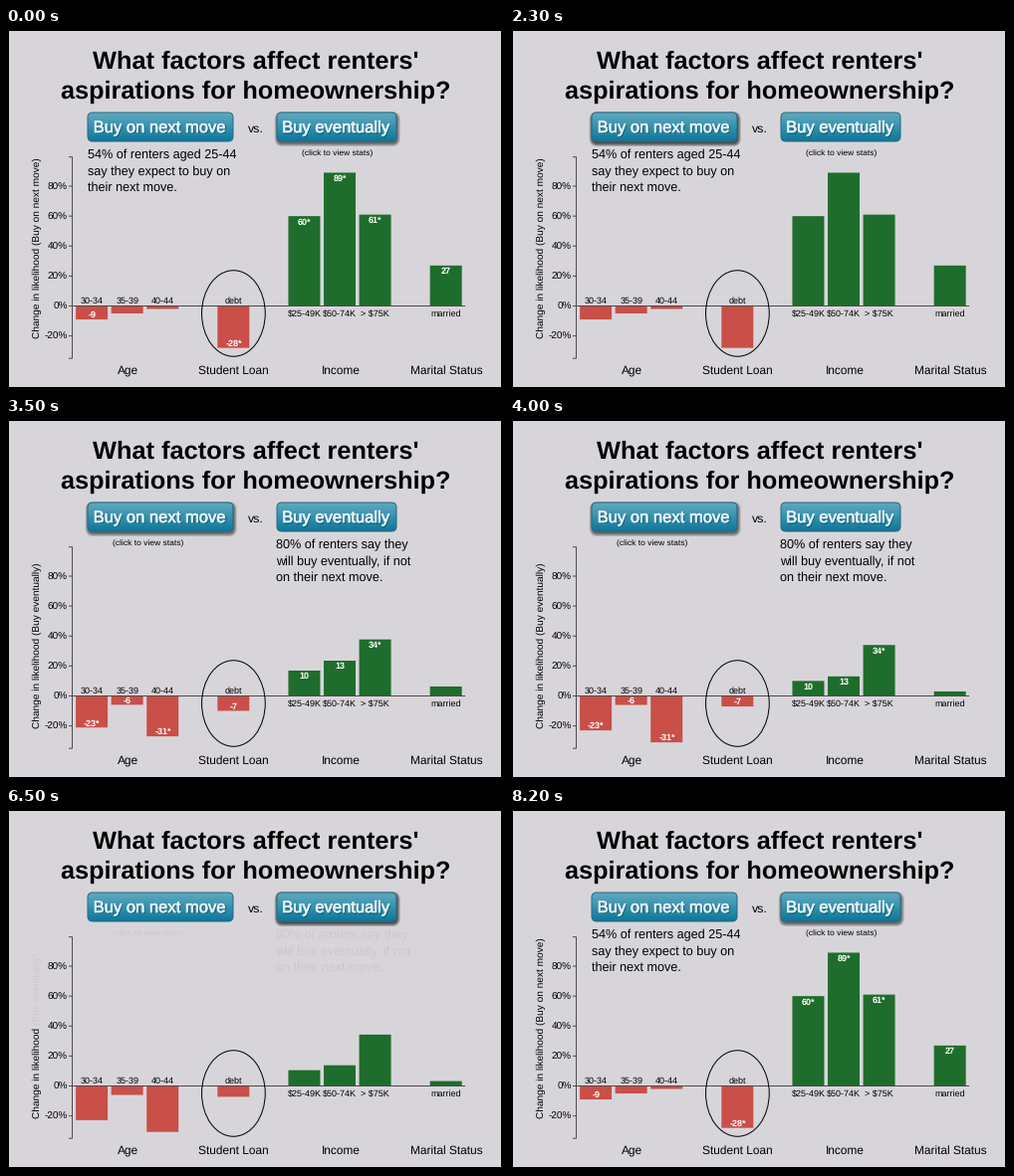
A matplotlib script that plays this animation: 500 by 364 pixels, repeating every 8500 ms.

```python
import matplotlib.pyplot as plt
import numpy as np
from matplotlib.animation import FuncAnimation
from matplotlib.colors import LinearSegmentedColormap
from matplotlib.patches import Ellipse, FancyBboxPatch, Rectangle
from matplotlib.patheffects import withStroke

plt.rcParams["font.family"] = "Liberation Sans"
plt.rcParams["text.hinting"] = "none"
plt.rcParams["path.snap"] = False

W, H, DPI = 500, 364, 100
STEP, LOOP = 100, 8500
CLICKS = (2170, 6187)      # to "eventually", back to "next move"
MOVE = 1900
ZERO, UNIT = 279.5, 1.506  # y of 0 % and pixels per percent
BG, RED, GREEN = "#d8d5da", "#c94f48", "#1f6d2c"

SLOTS = [0, 1, 2, 4, 6, 7, 8, 10]
NAMES = ["30-34", "35-39", "40-44", "debt",
         "$25-49K", "$50-74K", "> $75K", "married"]
VALUES = [np.array([-9, -5, -2, -28, 60, 89, 61, 27]),
          np.array([-23, -6, -31, -7, 10, 13, 34, 3])]
MARKS = [["-9", "", "", "-28*", "60*", "89*", "61*", "27"],
         ["-23*", "-6", "-31*", "-7", "10", "13", "34*", ""]]

fig = plt.figure(figsize=(W / DPI, H / DPI), dpi=DPI, facecolor="black")
ax = fig.add_axes([0, 0, 1, 1])
ax.axis("off")
ax.add_patch(Rectangle((3, 3), W - 6, H - 6, fc=BG, lw=0, zorder=0))


def pt(px):
    return px * 72 / DPI


def text(x, y, s, size, ha="left", **kw):
    kw.setdefault("color", "black")
    return ax.text(x, y, s, fontsize=pt(size), ha=ha, va="baseline", **kw)


def line(xs, ys, color="#4c4a4d", width=1):
    ax.plot(xs, ys, color=color, lw=pt(width), solid_capstyle="butt",
            solid_joinstyle="miter")


def rounded(x0, y0, x1, y1, r, **kw):
    box = FancyBboxPatch((x0, y0), x1 - x0, y1 - y0,
                         boxstyle=f"round,pad=0,rounding_size={r}", **kw)
    return ax.add_patch(box)


def button(x0, x1, label):
    y0, y1 = 85, 114
    shade = [rounded(x0 - g + 0.7, y0 - g + 2, x1 + g + 0.7, y1 + g + 2,
                     5 + g, fc="black", lw=0, zorder=2)
             for g in (0, 1, 2, 3)]
    face = rounded(x0, y0, x1, y1, 5, fc="none", ec="#236a84",
                   lw=pt(1), zorder=4)
    cmap = LinearSegmentedColormap.from_list(
        "teal", ["#62a9be", "#3392af", "#0f7697"])
    img = ax.imshow(np.linspace(0, 1, 64)[:, None], cmap=cmap, aspect="auto",
                    extent=(x0, x1, y1, y0), zorder=3,
                    interpolation="bilinear")
    img.set_clip_path(face)
    mid = (x0 + x1) / 2 - 0.8
    text(mid + 1, 106, label, 16.6, "center", color="#0d4258", alpha=0.5,
         zorder=5)
    text(mid, 105, label, 16.6, "center", color="#e9f1f5", zorder=6,
         path_effects=[withStroke(linewidth=pt(0.6), foreground="#e9f1f5")])
    return shade


def ease(t):
    t = min(max(t, 0), 1)
    return 4 * t ** 3 if t < 0.5 else 1 - 4 * (1 - t) ** 3


# heading and buttons
text(251, 41, "What factors affect renters'", 25.4, "center", weight="bold")
text(251, 71, "aspirations for homeownership?", 25.3, "center", weight="bold")
text(250.7, 105, "vs.", 12.4, "center")
shades = [button(82, 228, "Buy on next move"),
          button(272, 392, "Buy eventually")]

# axes
for pct in range(-20, 81, 20):
    y = ZERO - pct * UNIT
    line([63, 66.5], [y, y])
    text(62, y + 3.5, f"{pct}%", 10, "right")
top, bottom = ZERO - 99.5 * UNIT, ZERO + 35 * UNIT
line([63, 66.5, 66.5, 63], [top, top, bottom, bottom])
line([66.5, 461], [ZERO, ZERO])
text(33.6, 312, "Change in likelihood", 10.15, rotation=90,
     rotation_mode="anchor")

# bars with their captions
bars, marks = [], []
for slot, name, value in zip(SLOTS, NAMES, VALUES[0]):
    x = 70.1 + 35.56 * slot
    up = value > 0
    bars.append(ax.add_patch(Rectangle((x, ZERO), 32, 0, lw=0,
                                       fc=GREEN if up else RED)))
    text(x + 16.2, 290 if up else 277, name, 9, "center", zorder=5)
    marks.append(text(x + 16.2, ZERO, "", 9, "center", color="white",
                      weight="bold", zorder=5))
ax.add_patch(Ellipse((228.4, 287), 63.7, 86.5, fc="none", ec="black",
                     lw=pt(1), zorder=4))
for x, name in [(122.2, "Age"), (228.4, "Student Loan"), (336.2, "Income"),
                (442.2, "Marital Status")]:
    text(x, 348, name, 11.85, "center")


def notes(x, lines, hint_x, axis_note):
    """Texts that belong to one choice and fade as a group."""
    group = [text(x, 131.5 + 16.3 * i, s, 12.65) for i, s in enumerate(lines)]
    group.append(text(hint_x, 128, "(click to view stats)", 8.45, "center"))
    group.append(text(33.6, 217.8, axis_note, 10.15, rotation=90,
                      rotation_mode="anchor"))
    return group


groups = [
    notes(81.5, ["54% of renters aged 25-44", "say they expect to buy on",
                 "their next move."], 332.5, "(Buy on next move)"),
    notes(271.4, ["80% of renters say they", "will buy eventually, if not",
                  "on their next move."], 142.7, "(Buy eventually)"),
]

ax.set_xlim(0, W)
ax.set_ylim(H, 0)


def draw(n):
    now = n * STEP
    new = 1 if CLICKS[0] <= now < CLICKS[1] else 0
    old = 1 - new
    dt = (now - CLICKS[old]) % LOOP

    move = ease((dt - 50) / MOVE)
    level = VALUES[old] + (VALUES[new] - VALUES[old]) * move
    seen = ease((dt - 500) / 1000)
    for bar, mark, v, s in zip(bars, marks, level, MARKS[new]):
        bar.set_height(-v * UNIT)
        mark.set_text(s)
        mark.set_y(ZERO - v * UNIT + (8.3 if v > 0 else -1.8))
        mark.set_alpha(seen)

    for item in groups[old]:
        item.set_alpha(1 - ease((dt - 100) / 280))
    for item in groups[new]:
        item.set_alpha(ease((dt - 400) / 500))

    # the button that can be clicked next is lifted by a shadow
    lift = 0.22 - 0.05 * ease((dt - 400) / 1000)
    for i, shade in enumerate(shades):
        for layer in shade:
            layer.set_alpha(lift if i == old else 0)
    return []


anim = FuncAnimation(fig, draw, frames=LOOP // STEP, interval=STEP,
                     init_func=lambda: draw(0), repeat=True, repeat_delay=0,
                     blit=False)
plt.show()
```
